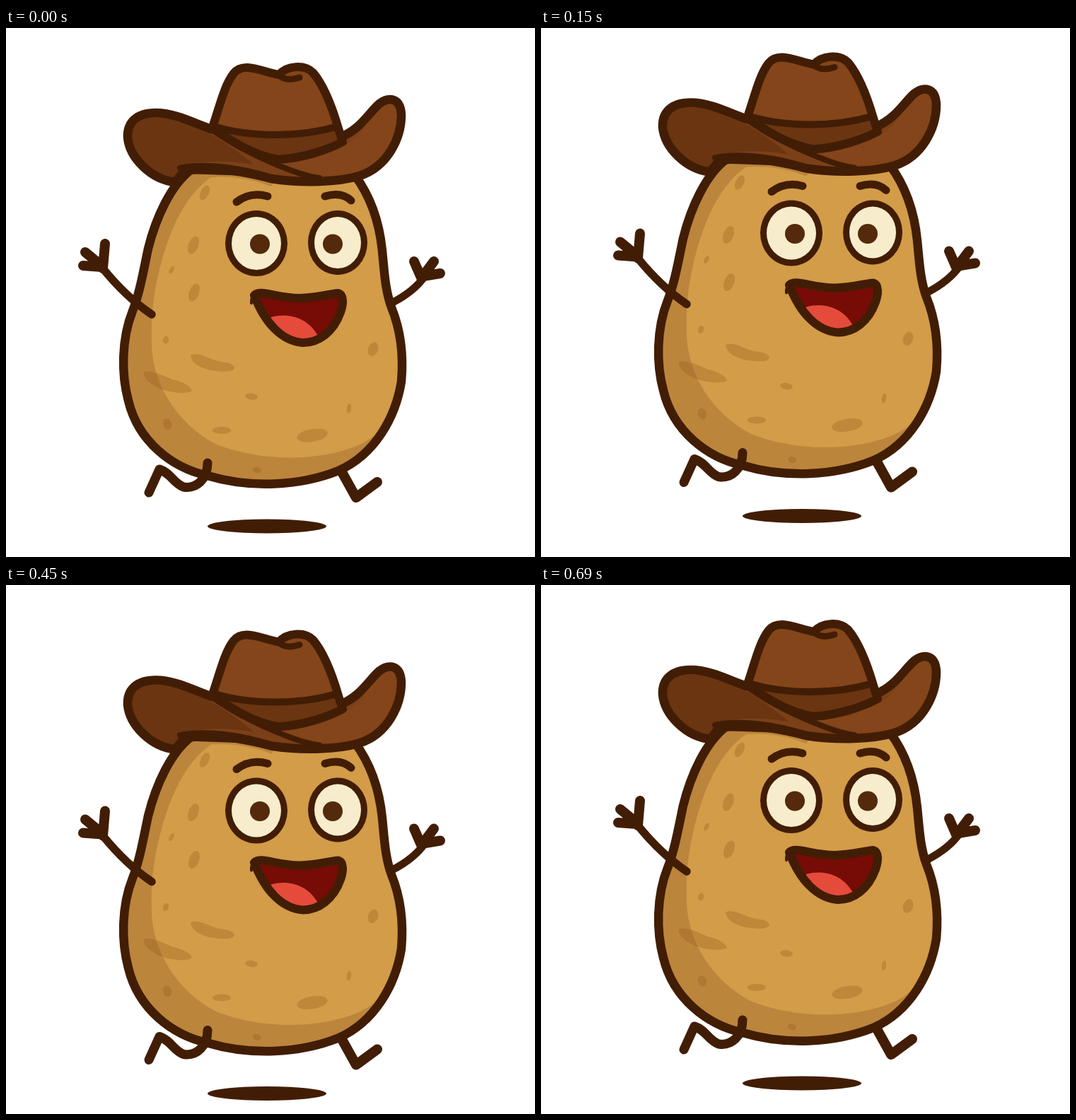
Write an HTML page with a canvas that moves like this. It is 748 by 748 pixels and loops after 0.75 s.

```html
<!DOCTYPE html>
<html lang="en">
<head>
<meta charset="utf-8">
<title>Bouncing potato</title>
<style>
html, body { margin: 0; width: 100%; height: 100%; overflow: hidden; background: #fff; }
canvas { display: block; width: 748px; height: 748px; }
</style>
</head>
<body>
<canvas id="stage" width="748" height="748"></canvas>
<script>
const ctx = document.getElementById('stage').getContext('2d');
const STEP = 150;
const BOUNCE = [0, -14.5, 0, 14.5, 0];

const INK = '#421d05', PUPIL = '#54290c';
const HAT = '#84451a', HAT_DARK = '#6a3510', HAT_MID = '#7b4018';
const SKIN = '#d29c48', SKIN_SHADE = '#bc853c', SPOT = 'rgba(140,82,22,.29)';
const EYE = '#f7edcd', MOUTH = '#760c05', TONGUE = '#e54b3b';

const path = d => new Path2D(d);

const body = path('M262 200C233 222 212 268 201 312C194 345 189 375 179 400' +
  'C163 440 163 490 173 527C187 585 235 622 285 633C345 651 415 648 470 626' +
  'C522 603 551 550 559 500C563 455 556 422 545 395C536 370 535 345 532 315C528 275 517 240 493 208Z');
const lightSide = path('M290 211C255 235 234 280 220 330C208 375 205 405 206 450' +
  'C208 500 238 558 298 589C360 613 440 614 498 590C515 583 528 570 540 558L600 500V195H400L375 224Q335 208 290 211Z');
const streaks = path('M261 464C263 458 278 462 290 468C304 474 319 471 323 480C322 488 305 486 290 484C275 481 263 474 261 464Z' +
  'M195 486C205 483 225 492 235 497C250 500 262 507 263 513C255 518 235 516 220 511C205 505 193 495 195 486Z');

const brim = path('M290 143C265 134 238 120 212 120C184 120 171 134 172 155' +
  'C175 184 205 214 239 218Q245 211 252 202C290 196 335 202 375 213C420 220 470 218 500 209' +
  'C540 196 559 155 559 123C558 98 541 97 528 107C512 121 502 142 474 154Z');
const brimRoll = path('M212 127C250 126 300 150 350 193C300 186 270 188 250 198L236 222L160 200V125Z');
const brimRight = path('M385 190C420 190 455 182 480 165C510 150 520 108 545 101L565 120L545 190L500 212L440 208Z');
const crown = path('M292 140C302 112 308 82 322 64C336 47 362 62 386 66C397 53 422 51 434 63' +
  'C451 83 463 118 470 142L476 161C455 172 420 184 385 186C350 180 315 159 292 140Z');
const band = path('M294 139C345 155 415 155 470 139L476 160C450 173 420 183 385 185C350 180 318 158 294 139Z');
const bandTop = path('M294 139C345 155 415 155 469 139');
const brimSweep = path('M291 144C330 171 370 189 402 201Q425 210 443 212');
const brimLip = path('M246 198C285 190 335 198 375 211');
const dent = path('M386 67Q396 76 415 70');

const mouth = path('M351 378C360 369 382 382 415 382C440 382 455 376 470 375' +
  'C478 377 477 391 473 402C463 430 442 445 420 445C390 443 366 417 351 378Z');
const tongue = path('M362 415C382 402 424 400 443 439L420 460L370 440Z');
const mouthTick = path('M353 376Q346 380 347 389');

const leftArm = path('M206 405C184 390 158 366 137 340');
const leftHand = path('M137 340L140 305M135 336L112 317M136 338L109 336');
const rightArm = path('M547 388C566 378 581 367 592 351');
const rightHand = path('M587 353L577 330M590 350L605 330M590 351L614 347');
const leftLeg = path('M285 615C285 637 270 652 251 649C236 643 234 630 217 624L202 657');
const rightLeg = path('M475 628L495 664L525 642');

// x, y, rx, ry, tilt
const spots = [
  [281, 233, 6, 11, .45], [265, 307, 7, 13, .35], [234, 342, 3, 6, .5],
  [266, 374, 7, 13, .35], [226, 441, 4, 5.5, .3], [519, 454, 7, 10, .35],
  [433, 576, 22, 9, -.17], [305, 569, 13, 5, 0], [347, 521, 9, 4.5, .15],
  [485, 538, 3, 7, .15], [355, 625, 6, 4.5, .3], [228, 560, 6, 8, -.3]
];

function fill(shape, color) {
  ctx.fillStyle = color;
  ctx.fill(shape);
}

function line(shape, width) {
  ctx.strokeStyle = INK;
  ctx.lineWidth = width;
  ctx.stroke(shape);
}

function oval(x, y, rx, ry, color, tilt = 0) {
  ctx.beginPath();
  ctx.ellipse(x, y, rx, ry, tilt, 0, Math.PI * 2);
  ctx.fillStyle = color;
  ctx.fill();
}

function inside(shape, draw) {
  ctx.save();
  ctx.clip(shape);
  draw();
  ctx.restore();
}

function eye(x, y, rx, ry, pupilX) {
  oval(x, y, rx, ry, INK);
  oval(x, y, rx - 9, ry - 9, EYE);
  oval(pupilX, 305.5, 14, 14, PUPIL);
}

function drawBody() {
  line(rightLeg, 14);
  line(rightArm, 11);
  line(rightHand, 14);
  fill(body, SKIN_SHADE);
  inside(body, () => {
    fill(lightSide, SKIN);
    for (const [x, y, rx, ry, tilt] of spots) oval(x, y, rx, ry, SPOT, tilt);
    fill(streaks, SPOT);
  });
  line(body, 12.5);
  line(leftLeg, 13);
  line(leftArm, 11.5);
  line(leftHand, 14);
}

function drawFace() {
  eye(354, 304.5, 44, 46.5, 359);
  eye(469, 303.5, 42, 45.5, 462);
  line(path('M326 246Q346 231 370 238'), 11);
  line(path('M451 238Q474 231 488 244'), 11);
  fill(mouth, MOUTH);
  inside(mouth, () => fill(tongue, TONGUE));
  line(mouth, 12);
  line(mouthTick, 4);
}

function drawHat() {
  fill(brim, HAT_MID);
  inside(brim, () => {
    fill(brimRoll, HAT_DARK);
    fill(brimRight, HAT);
  });
  line(brim, 12.5);
  fill(crown, HAT);
  fill(band, HAT_DARK);
  line(crown, 12);
  line(bandTop, 10);
  line(brimSweep, 8);
  line(brimLip, 8);
  line(dent, 9);
}

function draw(now) {
  const dy = BOUNCE[Math.floor(now / STEP) % BOUNCE.length];
  ctx.setTransform(1, 0, 0, 1, 0, 0);
  ctx.fillStyle = '#fff';
  ctx.fillRect(0, 0, 748, 748);
  ctx.translate(0, dy);
  ctx.lineCap = ctx.lineJoin = 'round';
  oval(369, 704.5, 84, 10, INK);
  drawBody();
  drawFace();
  drawHat();
}

let start;
function tick(now) {
  start ??= now;
  draw(Math.max(0, now - start));
  requestAnimationFrame(tick);
}
draw(0);
requestAnimationFrame(tick);
</script>
</body>
</html>
```
